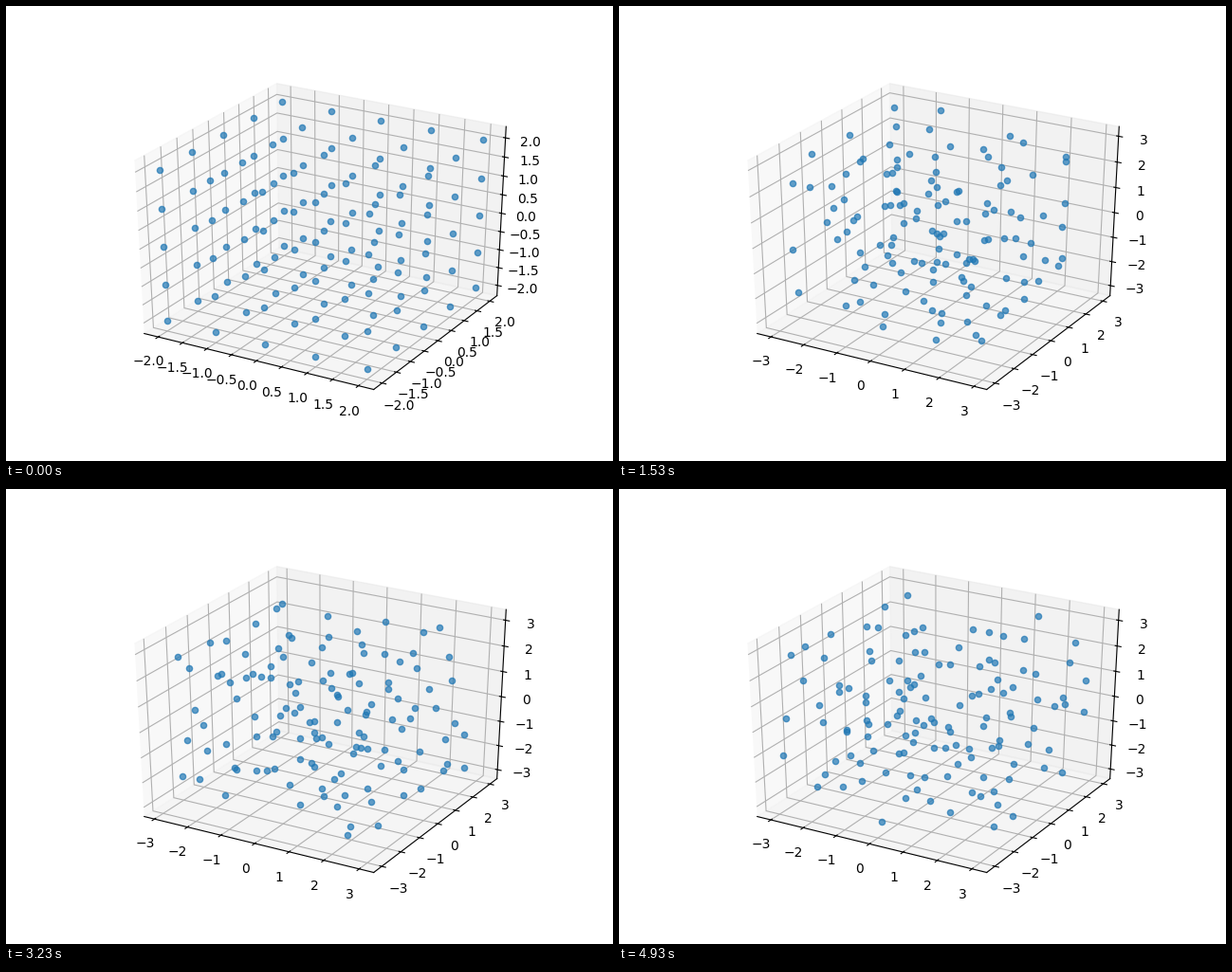
Recreate the animation shown at these times as a matplotlib script. Size 640 by 480 pixels, loop 5.1 s.

```python
import numpy as np
import matplotlib.pyplot as plt
from matplotlib.animation import FuncAnimation

FRAMES = 30
INTERVAL = 170
STEPS = 30        # integration steps per frame
DT = 0.01
WALL = 3.0        # half width of the box
SIGMA = 0.9       # particle size
SPEED = 1.3       # spread of each starting velocity component


def forces(pos):
    """Soft-sphere repulsion from the potential (SIGMA / r) ** 12."""
    gap = pos[:, None] - pos[None]
    r2 = (gap ** 2).sum(axis=2)
    np.fill_diagonal(r2, np.inf)
    strength = 12 * SIGMA ** 12 / r2 ** 7
    return (gap * strength[..., None]).sum(axis=1)


def simulate():
    """Particles leave a 5 x 5 x 5 lattice and bounce inside the box."""
    rng = np.random.default_rng(7)
    side = np.arange(-2.0, 3.0)
    pos = np.stack(np.meshgrid(side, side, side), axis=-1).reshape(-1, 3)
    vel = rng.normal(0, SPEED, pos.shape)
    vel -= vel.mean(axis=0)
    force = forces(pos)
    path = [pos.copy()]
    for _ in range(FRAMES - 1):
        for _ in range(STEPS):
            vel += force * DT / 2
            pos += vel * DT
            outside = np.abs(pos) > WALL
            vel[outside] *= -1
            pos[outside] = 2 * WALL * np.sign(pos[outside]) - pos[outside]
            force = forces(pos)
            vel += force * DT / 2
        path.append(pos.copy())
    return path


path = simulate()

fig = plt.figure(figsize=(6.4, 4.8), dpi=100)
ax = fig.add_subplot(projection="3d")

# Unit cube stretched over the whole subplot area instead of a square one.
ax.set_box_aspect((1, 1, 1), zoom=np.sqrt(3) / 1.8294640721620434)
ax.apply_aspect = lambda position=None: None


def draw(frame):
    ax.clear()
    ax.scatter(*path[frame].T, color="tab:blue", alpha=0.7, depthshade=False)
    return ax.collections


anim = FuncAnimation(fig, draw, frames=FRAMES, interval=INTERVAL,
                     init_func=lambda: draw(0), repeat=True, repeat_delay=0)
plt.show()
```
